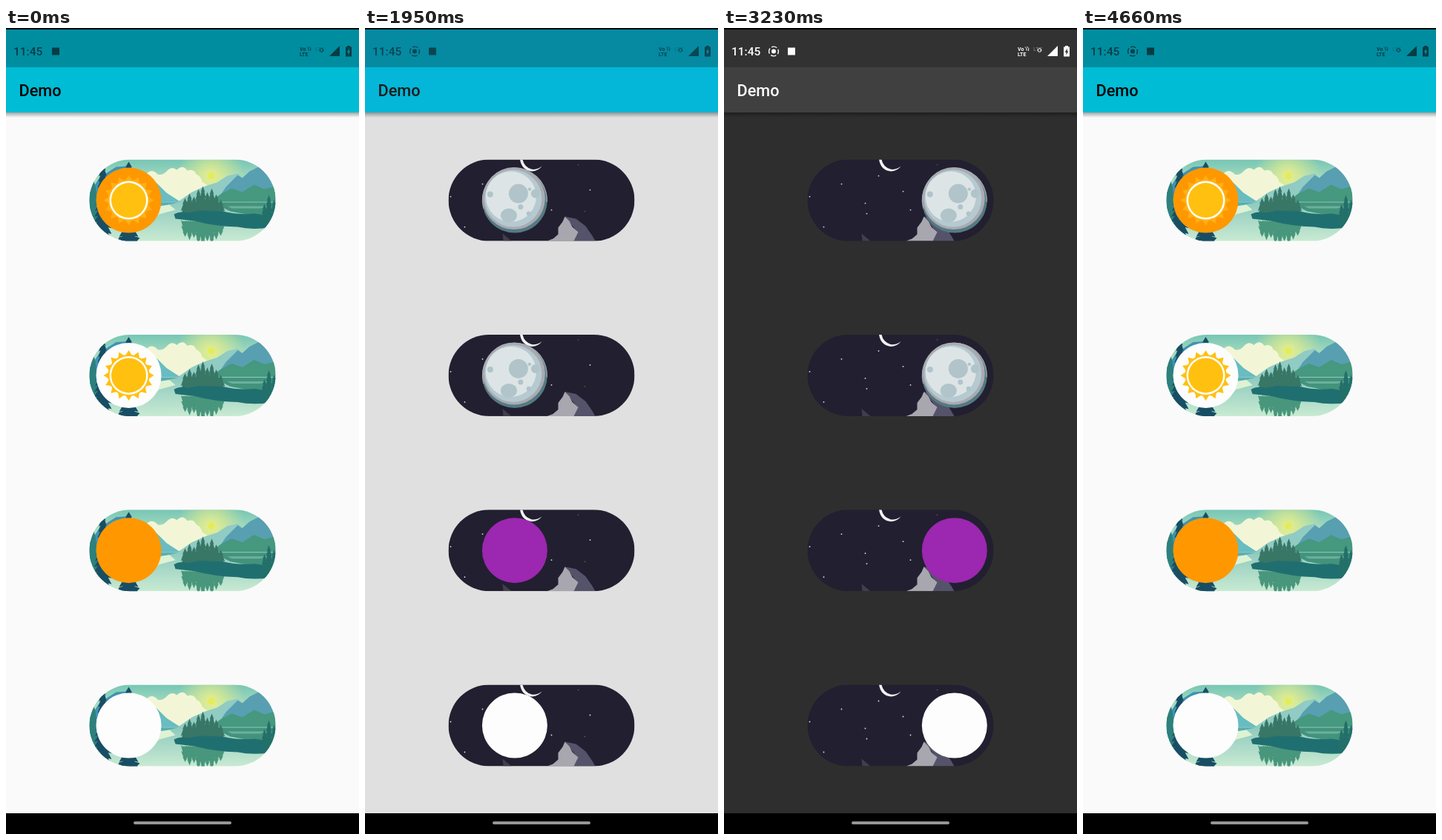
Animation of 476 by 1088 pixels, one loop 7590 ms. Source, as an HTML page:

```html
<!DOCTYPE html>
<html lang="en">
<head>
<meta charset="utf-8">
<title>Day and night switches</title>
<style>
  html, body { margin: 0; width: 100%; height: 100%; overflow: hidden; background: #000; }
  svg { display: block; }
  text { font-family: Roboto, "Open Sans", sans-serif; }
</style>
</head>
<body>
<svg id="stage" width="476" height="1088" viewBox="0 0 476 1088"></svg>
<script>
const LOOP = 7590;
const NIGHT_ON = 1930, NIGHT_OFF = 3530;
const LEFT = 53, RIGHT = 198.3;
const stage = document.getElementById('stage');

const path = (d, fill) => `<path d="${d}" fill="${fill}"/>`;
const dot = (x, y, r, fill) => `<circle cx="${x}" cy="${y}" r="${r}" fill="${fill}"/>`;

// Pine silhouette: stepped branches widening towards the base.
function pine(x, top, base, width) {
  const n = Math.max(3, Math.round(Math.abs(base - top) / 8));
  const left = [], right = [];
  for (let i = 1; i <= n; i++) {
    const y = top + (base - top) * i / n;
    const w = width / 2 * Math.min(1, .3 + i / n);
    left.push(`${x - w} ${y}`, `${x - w * .6} ${y - (base - top) / n * .15}`);
    right.push(`${x + w} ${y}`, `${x + w * .6} ${y - (base - top) / n * .15}`);
  }
  return `M${x} ${top}L${right.join('L')}L${left.reverse().join('L')}Z`;
}

function grove(tops, base, flip) {
  return tops.map((top, i) => {
    const x = 129 + i * 6;
    return flip ? pine(x, base + (base - top) * .75, base, 11) : pine(x, top, base, 12);
  }).join('');
}

function dayScene() {
  const tops = [52, 46, 50, 40, 36, 44, 39, 47, 54];
  return `<rect width="251" height="110" fill="url(#sky)"/>
    <rect width="251" height="60" fill="url(#glow)"/>` +
    path('M70 60L76 20Q84 11 92 20Q98 22 104 16Q111 8 118 14Q126 6 132 15Q141 12 144 20Q150 22 152 30L166 40L170 58Z', '#f2f6d6') +
    dot(164.5, 22, 4.6, '#e4ec58') +
    path('M118 58L138 44L156 36L172 31L186 22L200 19L216 33L232 58Z', '#90cbc4') +
    path('M170 58L184 37L200 21L206 25L216 16L230 9L251 0V60Z', '#589fb2') +
    path('M160 59L178 46L192 39L206 44L222 34L236 40L251 36V62Z', '#46987e') +
    path('M0 45L14 24L36 10L50 9L62 20L74 31L88 38L104 48L122 58H0Z', '#3f93b4') +
    path('M34 58L56 42L70 36L80 23L92 33L104 45L124 58Z', '#68bcc2') +
    path('M0 58V42L22 46L40 50L62 49L84 55L100 58Z', '#348f9e') +
    `<rect y="57" width="251" height="53" fill="url(#lake)"/>` +
    path('M0 58H120L98 63L70 72L44 84L20 78L0 82Z', '#58aeb2') +
    path('M0 60H70L46 67L22 72L0 70Z', '#36938e') +
    path('M72 66L108 61L116 68L94 74L80 88Z', '#def2d4') +
    path('M166 58H251V84L222 76L190 70Z', '#43937c') +
    path('M186 63H244L230 66H192Z', '#6cb09c') +
    path(grove(tops, 82, true), '#48967c') +
    path(grove(tops, 78, false), '#387666') +
    path('M114 74Q122 69 134 72L148 69L180 70Q200 75 222 73Q236 74 243 79V92Q218 95 200 91Q168 90 142 83L116 80Z', '#206f70') +
    path(pine(236, 60, 88, 9) + pine(242, 48, 94, 12) + pine(249, 54, 96, 12), '#23706a') +
    path('M219 110Q232 98 251 88V110Z', '#267a74') +
    path('M0 20Q10 30 9 52Q13 78 8 110H0Z', '#2d807c') +
    path(pine(18, 7, 116, 24) + pine(53, 3, 112, 26), '#184e64') +
    path('M40 105Q52 100 68 106L64 110H38Z', '#184e64');
}

function nightScene() {
  const stars = [[46, 33], [96, 22], [78, 59], [80, 73], [129, 43], [139, 68], [191, 41], [3, 50], [22, 91]];
  return `<rect width="251" height="110" fill="#221f30"/>` +
    stars.map(([x, y]) => dot(x, y, .9, '#dcdce0')).join('') +
    dot(184, 70, .7, '#74727c') + dot(175, 7, .7, '#74727c') +
    path('M96.500 0Q99 15 113 16Q122 15 126 9Q119 14.500 112 13Q102 10 100 0Z', '#f2f2f2') +
    path('M73 100L85 110H74Z', '#423e4c') +
    path('M157 77L172 80L185 90L194 103L198 110H168L174 98Z', '#55536a') +
    path('M133 110L141 107L148 101L148 92L154 84L157 77L163 83L167 91L175 98L169 110Z', '#a8a6ae');
}

function sun(rayFill) {
  let rays = '';
  for (let i = 0; i < 16; i++)
    rays += `<path d="M0 -34L5 -26H-5Z" transform="rotate(${i * 22.5})" fill="${rayFill}"/>`;
  return rays + dot(0, 0, 28, rayFill) + dot(0, 0, 26, '#fff') + dot(0, 0, 23.5, '#ffc010');
}

function moon() {
  const craters = [[5, -9, 13], [-33, -8, 4], [28, -9, 6], [8, 9, 3.5], [19, 18, 3.2], [20, -15, 2.2]];
  return dot(0, 0, 44, '#547a84') + dot(-1, -2.5, 42, '#a9abb2') +
    `<circle r="43.400" fill="none" stroke="#a9abb2" stroke-width="1.200" stroke-dasharray="150 123" transform="rotate(165)"/>` +
    dot(-2, -2.5, 38.5, '#b5cad0') + dot(-5, -5, 34, '#dde4e6') +
    craters.map(c => dot(...c, '#b0c4ca')).join('') +
    `<ellipse cx="-8" cy="20.500" rx="11" ry="9.500" fill="#b0c4ca"/>`;
}

// Day face, night face for each switch.
const disc = fill => dot(0, 0, 44, fill);
const faces = [
  [disc('#ff9800') + sun('#ffb114'), moon()],
  [disc('#fdfdfd') + sun('#ffc010'), moon()],
  [disc('#ff9800'), disc('#9c27b0')],
  [disc('#fdfdfd'), disc('#fdfdfd')]
];

const switches = faces.map(([day, night], i) => `
  <g transform="translate(112.500 ${177.6 + i * 236.3})">
    <g clip-path="url(#pill)">
      <use href="#day" class="day"/><use href="#night" class="night"/>
    </g>
    <g class="thumb"><g class="day">${day}</g><g class="night">${night}</g></g>
  </g>`).join('');

stage.innerHTML = `
  <defs>
    <clipPath id="pill"><rect width="251" height="110" rx="55"/></clipPath>
    <linearGradient id="sky" x2="0" y2="1">
      <stop stop-color="#76c6b4"/><stop offset=".28" stop-color="#b0dec2"/><stop offset=".52" stop-color="#e0f2d2"/>
    </linearGradient>
    <radialGradient id="glow" gradientUnits="userSpaceOnUse" cx="164" cy="22" r="46">
      <stop stop-color="#e6ee8c"/><stop offset="1" stop-color="#e6ee8c" stop-opacity="0"/>
    </radialGradient>
    <linearGradient id="lake" x2="0" y2="1">
      <stop stop-color="#8ecabe"/><stop offset="1" stop-color="#c8ead2"/>
    </linearGradient>
    <linearGradient id="shade" x2="0" y2="1">
      <stop stop-opacity=".34"/><stop offset="1" stop-opacity="0"/>
    </linearGradient>
    <g id="day">${dayScene()}</g>
    <g id="night">${nightScene()}</g>
  </defs>
  <rect id="page" width="476" height="1088"/>
  <rect y="114" width="476" height="7" fill="url(#shade)"/>
  <rect id="bar" y="53" width="476" height="61"/>
  <rect id="status" y="2" width="476" height="51"/>
  <rect width="476" height="2"/>
  <text id="title" x="17.500" y="92" font-size="21.700" font-weight="500">Demo</text>
  <g id="icons">
    <text x="10" y="37" font-size="15.500" font-weight="500">11:45</text>
    <g id="record" transform="translate(67 31.500)">
      <circle r="3"/>
      <circle r="6.400" fill="none" stroke="currentColor" stroke-width="1.400" stroke-dasharray="7.500 2.550" stroke-dashoffset="3.750"/>
    </g>
    <rect id="badge" x="-5" y="26.500" width="10" height="10"/>
    <g font-size="7" font-weight="700">
      <text x="396" y="30.500">Vo</text><text x="396" y="38">LTE</text>
      <text x="417" y="30.500" font-size="8" font-weight="400" opacity=".4">LTE</text>
    </g>
    <path d="M406 25.500Q409 27.500 408 30.500M408.500 25Q412 27 410.500 31" fill="none" stroke="currentColor"/>
    <circle cx="425.500" cy="30" r="2.300" fill="none" stroke="currentColor"/>
    <path d="M450 24V38H436Z"/>
    <path fill-rule="evenodd" d="M460 24H464V25.500H466V38.500H458V25.500H460ZM462.700 27.500L459.800 32.800H461.500V36.500L464.300 31.200H462.700Z"/>
  </g>
  <rect y="1060" width="476" height="28"/>
  <rect x="172" y="1071" width="132" height="4" rx="2" fill="#969696"/>
  ${switches}`;

// time, page, bar, status, title, icons
const theme = [
  [1910, 'fafafa', '00bcd4', '008da0', '000000', '083c44'],
  [1950, 'e0e0e0', '04b6d8', '058aa2', '1a1a1a', '0a4650'],
  [2050, 'c0c0c0', '0ea0ba', '0e788c', '505050', '2a5a64'],
  [2420, '2e2e2e', '404040', '343434', 'fdfdfd', 'a8a8a8'],
  [2680, '2e2e2e', '404040', '323232', 'fdfdfd', 'fdfdfd'],
  [3530, '2e2e2e', '404040', '323232', 'fdfdfd', 'fdfdfd'],
  [3630, '484848', '575757', '414141', 'dcdcdc', 'fdfdfd'],
  [3980, 'aeaeae', '04b6d0', '058a9c', '5c5c5c', 'a4ccd2'],
  [4260, 'fafafa', '00bcd4', '008da0', '000000', '5a949c'],
  [4600, 'fafafa', '00bcd4', '008da0', '000000', '083c44']
].map(([t, ...colors]) => [t, ...colors.flatMap(c => [0, 2, 4].map(i => parseInt(c.slice(i, i + 2), 16)))]);

const slide = [[1910, 0], [1950, .25], [2050, .3], [2330, 1], [3530, 1], [3630, .75], [3930, 0]];
const badge = [[1040, 67, 0], [1160, 75, 0], [1240, 82, .12], [1380, 89, .7], [1500, 91, 1]];

function sample(keys, t) {
  const i = keys.findIndex(k => k[0] > t);
  if (i === 0) return keys[0].slice(1);
  if (i < 0) return keys[keys.length - 1].slice(1);
  const a = keys[i - 1], b = keys[i], p = (t - a[0]) / (b[0] - a[0]);
  return a.slice(1).map((v, j) => v + (b[j + 1] - v) * p);
}

const all = s => [...stage.querySelectorAll(s)];
const painted = ['page', 'bar', 'status', 'title', 'icons'].map(id => document.getElementById(id));
const thumbs = all('.thumb'), days = all('.day'), nights = all('.night');
const record = document.getElementById('record'), mark = document.getElementById('badge');

function draw(t) {
  const c = sample(theme, t);
  painted.forEach((el, i) => {
    const rgb = `rgb(${c.slice(i * 3, i * 3 + 3).map(Math.round)})`;
    el.style.fill = el.style.color = rgb;
  });

  const night = t >= NIGHT_ON && t < NIGHT_OFF;
  days.forEach(el => el.style.display = night ? 'none' : '');
  nights.forEach(el => el.style.display = night ? '' : 'none');
  const x = LEFT + (RIGHT - LEFT) * sample(slide, t)[0];
  thumbs.forEach(el => el.setAttribute('transform', `translate(${x} 55)`));

  const [bx, alpha] = sample(badge, t);
  mark.setAttribute('transform', `translate(${bx} 0)`);
  record.setAttribute('opacity', alpha);
}

const start = performance.now();
function tick() {
  draw((performance.now() - start) % LOOP);
  requestAnimationFrame(tick);
}
tick();
</script>
</body>
</html>
```
